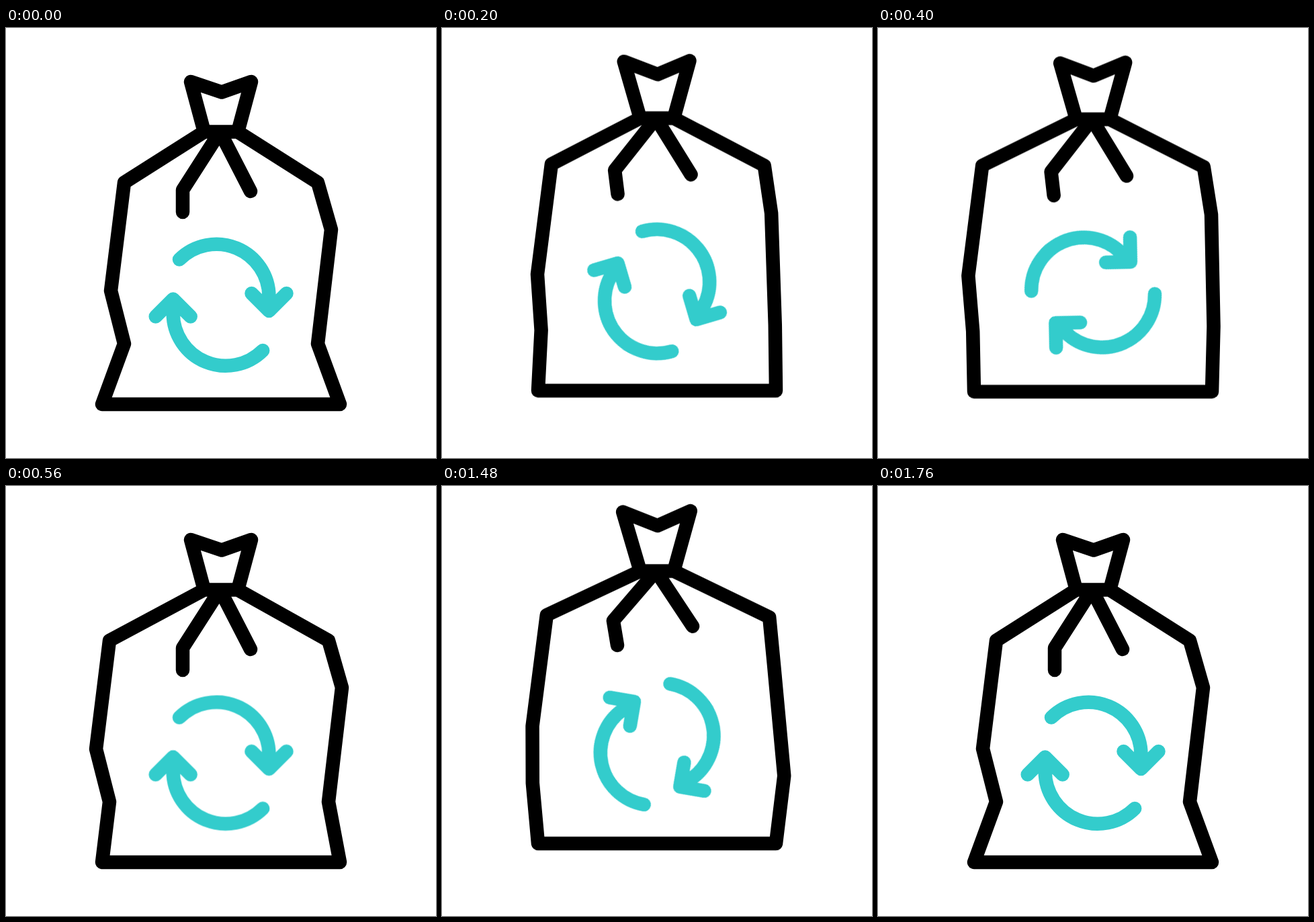
These frames come from a looping animation (640x640 px, 2 s). An HTML page:

```html
<!DOCTYPE html>
<html lang="en">
<head>
<meta charset="utf-8">
<title>Recycling bag</title>
<style>
  :root {
    --ease: cubic-bezier(.333, 0, .667, 1);
    --late-ease: cubic-bezier(.333, 0, .833, 1);
    --early-ease: cubic-bezier(.167, 0, .667, 1);

    /* outline, mouth, strings */
    --slim: path("M295 154.5L176 230 156 391 176 470 143 560 497 560 464 470 484 300 464 230 345 154.5Z M295 154.5L275 80 321 95.5 365 80 345 154.5 M263 274L263 241 318.5 154.5 364 243");
    --airborne: path("M295 154.5L156 219 134.6 384.5 132.7 470 143 560 497 560 512.5 458 493.4 294 488 222.4 345 154.5Z M295 154.5L268.5 65 321 86 370.3 63.4 345 154.5 M260.8 264L254 227 318.5 154.5 374 236");
    --full: path("M295 154.5L154 230 134 391.5 154 470 143 560 497 560 480 470 500 300 480 230 345 154.5Z M295 154.5L275 80 321 95.5 365 80 345 154.5 M263 274L263 241 318.5 154.5 364 243");
  }

  html, body {
    margin: 0;
    width: 100%;
    height: 100%;
    overflow: hidden;
    background: #fff;
  }

  svg {
    display: block;
    width: 100%;
    height: 100%;
    fill: none;
    stroke-width: 20.5;
    stroke-linecap: round;
    stroke-linejoin: round;
  }

  .jump, .bag, .arrows {
    animation: 2s var(--ease) infinite;
  }

  .jump { animation-name: jump; }

  .bag {
    d: var(--slim);
    stroke: #000;
    animation-name: morph;
  }

  .arrows {
    stroke: #33cccc;
    transform-origin: 320.1px 412.25px;
    animation-name: spin;
  }

  @keyframes jump {
    0%, 4%, 28%, 66%, 88%, 100% { transform: translateY(0); }
    14%, 76% { transform: translateY(-31px); }
    66% { animation-timing-function: var(--early-ease); }
    76% { animation-timing-function: var(--late-ease); }
  }

  @keyframes morph {
    0%, 4%, 88%, 100% { d: var(--slim); }
    14%, 76% { d: var(--airborne); }
    28%, 66% { d: var(--full); }
  }

  @keyframes spin {
    0%, 4% { transform: rotate(0deg); }
    28%, 66% { transform: rotate(180deg); }
    66% { animation-timing-function: var(--late-ease); }
    88%, 100% { transform: rotate(360deg); }
  }
</style>
</head>
<body>
<svg viewBox="0 0 640 640">
  <defs>
    <path id="arrow" d="M258 344.5A78.3 78.3 0 0 1 391.5 400V421M365.5 395l26 26 26-26"/>
  </defs>
  <g class="jump">
    <path class="bag"/>
    <g class="arrows">
      <use href="#arrow"/>
      <use href="#arrow" transform="rotate(180 320.1 412.25)"/>
    </g>
  </g>
</svg>
</body>
</html>
```
